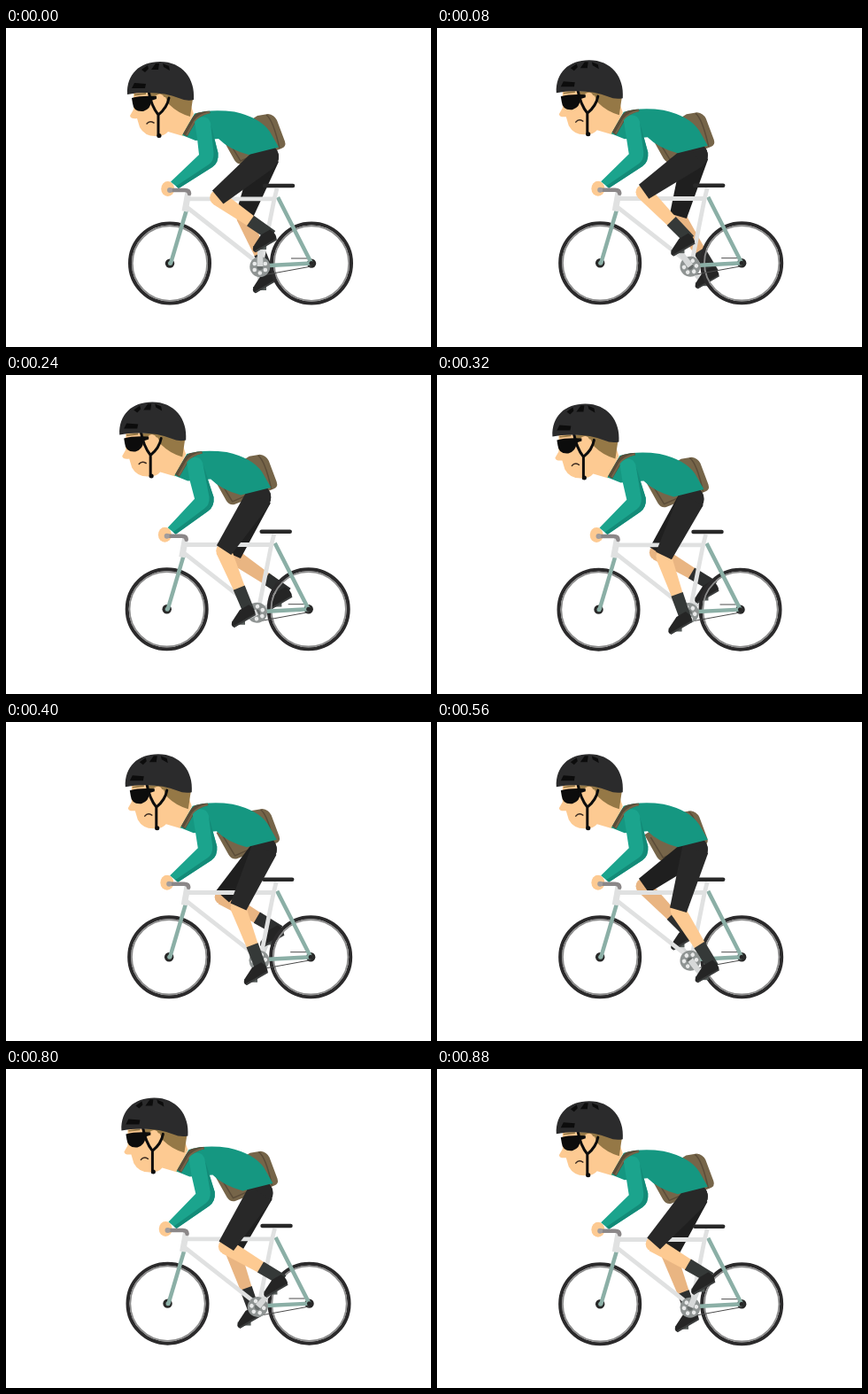
Write an HTML page with a canvas that moves like this. It is 480 px wide and 360 px high and loops after 960 ms.

```html
<!DOCTYPE html>
<html lang="en">
<head>
<meta charset="utf-8">
<title>Cyclist</title>
<style>
html, body { margin: 0; width: 100%; height: 100%; overflow: hidden; background: #fff; }
canvas { display: block; }
</style>
</head>
<body>
<canvas id="stage" width="480" height="360"></canvas>
<script>
const ctx = document.getElementById('stage').getContext('2d');
const STEPS = 12, STEP_MS = 80;
const SKIN = '#fdca92', SKIN_DARK = '#e9b582', DARK = '#282828', BLACK = '#0c0c0c';
const TEAL = '#159781', TEAL_LIGHT = '#1ba48d', FRAME = '#e0e1e1', STAY = '#8bafa6';
const PACK = '#766549', PACK_DARK = '#5b4c38', HAIR = '#957846';
const THIGH = 72, SHIN = 71;

function fill(path, color) {
  ctx.fillStyle = color;
  ctx.fill(new Path2D(path));
}

function stroke(path, color, width, cap = 'butt') {
  ctx.strokeStyle = color;
  ctx.lineWidth = width;
  ctx.lineCap = cap;
  ctx.lineJoin = 'round';
  ctx.stroke(new Path2D(path));
}

function ellipse(x, y, rx, ry, color, turn = 0) {
  ctx.fillStyle = color;
  ctx.beginPath();
  ctx.ellipse(x, y, rx, ry, turn, 0, 7);
  ctx.fill();
}

const disc = (x, y, r, color) => ellipse(x, y, r, r, color);

function ring(x, y, r, color, width) {
  ctx.strokeStyle = color;
  ctx.lineWidth = width;
  ctx.beginPath();
  ctx.arc(x, y, r, 0, 7);
  ctx.stroke();
}

function at(x, y, draw, turn = 0) {
  ctx.save();
  ctx.translate(x, y);
  ctx.rotate(turn);
  draw();
  ctx.restore();
}

const mix = (a, b, t) => ({ x: a.x + (b.x - a.x) * t, y: a.y + (b.y - a.y) * t });

// Tapered limb segment with half-widths ra and rb
function taper(a, b, ra, rb, color) {
  const len = Math.hypot(b.x - a.x, b.y - a.y);
  const nx = (a.y - b.y) / len, ny = (b.x - a.x) / len;
  fill(`M${a.x + nx * ra} ${a.y + ny * ra} L${b.x + nx * rb} ${b.y + ny * rb}
    L${b.x - nx * rb} ${b.y - ny * rb} L${a.x - nx * ra} ${a.y - ny * ra}Z`, color);
}

function bendKnee(hip, ankle) {
  const dx = ankle.x - hip.x, dy = ankle.y - hip.y, dist = Math.hypot(dx, dy);
  const along = (THIGH ** 2 - SHIN ** 2 + dist ** 2) / (2 * dist);
  const out = Math.sqrt(Math.max(0, THIGH ** 2 - along ** 2));
  return {
    x: hip.x + (dx * along - dy * out) / dist,
    y: hip.y + (dy * along + dx * out) / dist
  };
}

function crank(center, angle) {
  const pedal = { x: center.x - 23 * Math.sin(angle), y: center.y - 23 * Math.cos(angle) };
  taper(center, pedal, 3.5, 2.8, '#d6d8d8');
  fill(`M${pedal.x - 8} ${pedal.y}h15v4h-15z`, '#555b59');
  return pedal;
}

function leg(hip, pedal, skin, shorts, sock) {
  const foot = { x: pedal.x + 4, y: pedal.y - 5 };
  const ankle = { x: foot.x + 6, y: foot.y - 9 };
  const knee = bendKnee(hip, ankle);
  disc(knee.x, knee.y, 8.5, skin);
  taper(knee, ankle, 8.8, 5.5, skin);
  taper(mix(knee, ankle, 0.64), mix(knee, ankle, 1.06), 7, 6.5, sock);
  at(foot.x, foot.y, () => {
    fill('M13 -8Q17 0 14 5L-14 6Q-18 2 -11 -2L1 -8Z', '#252525');
    stroke('M-14 5H14', '#3b3d3d', 2);
  }, -Math.PI / 6);
  disc(hip.x, hip.y, 14, shorts);
  taper(hip, mix(hip, knee, 0.99), 15, 9.8, shorts);
}

function wheel(x) {
  ring(x, 265.6, 45, '#2b2a2b', 4);
  ring(x, 265.6, 42.2, '#8c8c8c', 1.8);
  disc(x, 265.6, 5.2, DARK);
}

function bike(angle) {
  wheel(185);
  wheel(345);
  stroke('M322 260H340M290 279L345 269', '#4b4b4b', 1);
  stroke('M307 191L345 265.6L288 268.5', STAY, 4.5);
  stroke('M204 205L186 265.6', STAY, 4.5);
  disc(185.5, 265.6, 2.5, STAY);
  disc(345, 265.6, 2.5, DARK);
  stroke('M205 192.8H305M204 202L287 267M306 181L303 193L288 268', FRAME, 4.8);
  stroke('M206 185L202 207', FRAME, 7);
  stroke('M292 178H324', DARK, 4.5, 'round');
  at(286.8, 269.5, () => {
    disc(0, 0, 11.5, '#8f9493');
    for (let i = 0; i < 6; i++) {
      const a = i * Math.PI / 3;
      disc(7 * Math.sin(a), 7 * Math.cos(a), 2.3, '#e9eaea');
    }
    disc(0, 0, 3.5, '#686d6c');
  }, -angle);
}

function pack(swing) {
  at(-7.5 * swing, 5 * swing, () => {
    fill('M284 99L296 97Q303 98 306 104L315 128Q317 134 311 136L268 153Q262 155 258 149L244 124Z', PACK);
    stroke('M294 98Q302 104 309 136M251 127L265 150L281 143', PACK_DARK, 1.5);
  });
}

function torso() {
  const shirt = 'M199 121L213 96.5Q232 91 258 94.5Q287 101 298 117L308 134.5L274 143Q252 137 240 125L214 127Z';
  fill(shirt, TEAL);
  ctx.save();
  ctx.clip(new Path2D(shirt));
  stroke('M202 121L212 104Q217 96 230 93', PACK_DARK, 6);
  stroke('M204 121L213 105Q218 98 230 95', PACK, 2);
  ctx.restore();
}

function arm(dx, dy) {
  const ex = dx * 0.7, ey = dy * 0.7;
  const inner = `${218 + ex} ${143 + ey}`, outer = `${239.5 + ex} ${141 + ey}`;
  const bend = `Q${240.5 + ex} ${152 + ey} ${233 + ex} ${157 + ey}`;
  const cuff = `${195 + dx} ${181 + dy}`;
  fill(`M213 106Q220 97 228 102Q232 106 233 116L${outer}${bend}
    L${cuff}L${186 + dx} ${173.5 + dy}L${inner}L216 125Z`, TEAL_LIGHT);
  fill(`M231 107L${outer}${bend}L${cuff}L${192 + dx} ${178.5 + dy}
    L${229 + ex} ${154 + ey}Q${235 + ex} ${150 + ey} ${234.5 + ex} ${141 + ey}Z`, '#138b78');
}

function head() {
  fill('M144 72L144 92L140 99Q141 103 148 102L151 112Q157 123 171 122Q179 122 183 117L200 122L212 97L205 76Z', SKIN);
  fill('M160 73L178 73L211 80L208 100Q194 96 184 86L180 78L166 78L164 84Z', HAIR);
  ellipse(173, 83, 6.5, 8.5, SKIN, 0.2);
  fill('M142 79Q152 76 170 77V80L164 82Q164 91 155 94Q144 95 143 85Z', BLACK);
  stroke('M145 75.5L158 74', HAIR, 2);
  stroke('M159 108Q162 104 167 107', '#3a2a20', 1.5, 'round');
  stroke('M161 71Q164 88 172 98V122M184 79Q182 90 172 98', BLACK, 3, 'round');
  disc(173, 121.5, 2.5, BLACK);
  fill('M137 75C136 52 151 38 174 38C199 38 214 57 212 81Q204 83 195 79Q181 73 160 73Q146 73 137 75Z', '#2b2b2c');
  fill('M142 68L145 62L158 63L157 68Z', BLACK);
  fill('M153 47L160 42L161 46L157 50ZM164 47L169 40L173 40L172 47ZM177 40L184 43L185 48L178 44Z', BLACK);
}

function draw(step) {
  const bob = (1 - Math.cos(step * Math.PI / 3)) / 2;
  const angle = (30 * step + 26 * bob) * Math.PI / 180;
  const swing = ((1 - Math.cos((step - 1) * Math.PI / 6)) / 2) ** 2;
  const body = { x: -8.8 * bob, y: -7.5 * bob };
  const ride = { x: -3.3 * bob, y: -1.3 * bob };
  const hip = { x: 294 + body.x, y: 145.5 + body.y };
  const axle = { x: 287 + ride.x, y: 269 + ride.y };
  const wrist = { x: ride.x - body.x, y: ride.y - body.y };

  ctx.fillStyle = '#fff';
  ctx.fillRect(0, 0, 480, 360);
  at(body.x, body.y, () => pack(swing));
  leg(hip, crank(axle, angle + Math.PI), SKIN_DARK, '#1f1f1f', '#2d2f2f');
  at(ride.x, ride.y, () => bike(angle));
  leg(hip, crank(axle, angle), SKIN, DARK, '#353938');
  at(body.x, body.y, () => {
    head();
    torso();
  });
  at(ride.x, ride.y, () => ellipse(182.7, 181.5, 7.5, 8.5, SKIN));
  at(body.x, body.y, () => arm(wrist.x, wrist.y));
  at(ride.x, ride.y, () => {
    stroke('M186 183H202Q207 183 207 187', '#8b8788', 4.5, 'round');
    disc(185, 183, 3, '#a09c9c');
  });
}

function tick() {
  draw(Math.floor(performance.now() / STEP_MS) % STEPS);
  requestAnimationFrame(tick);
}
tick();
</script>
</body>
</html>
```
